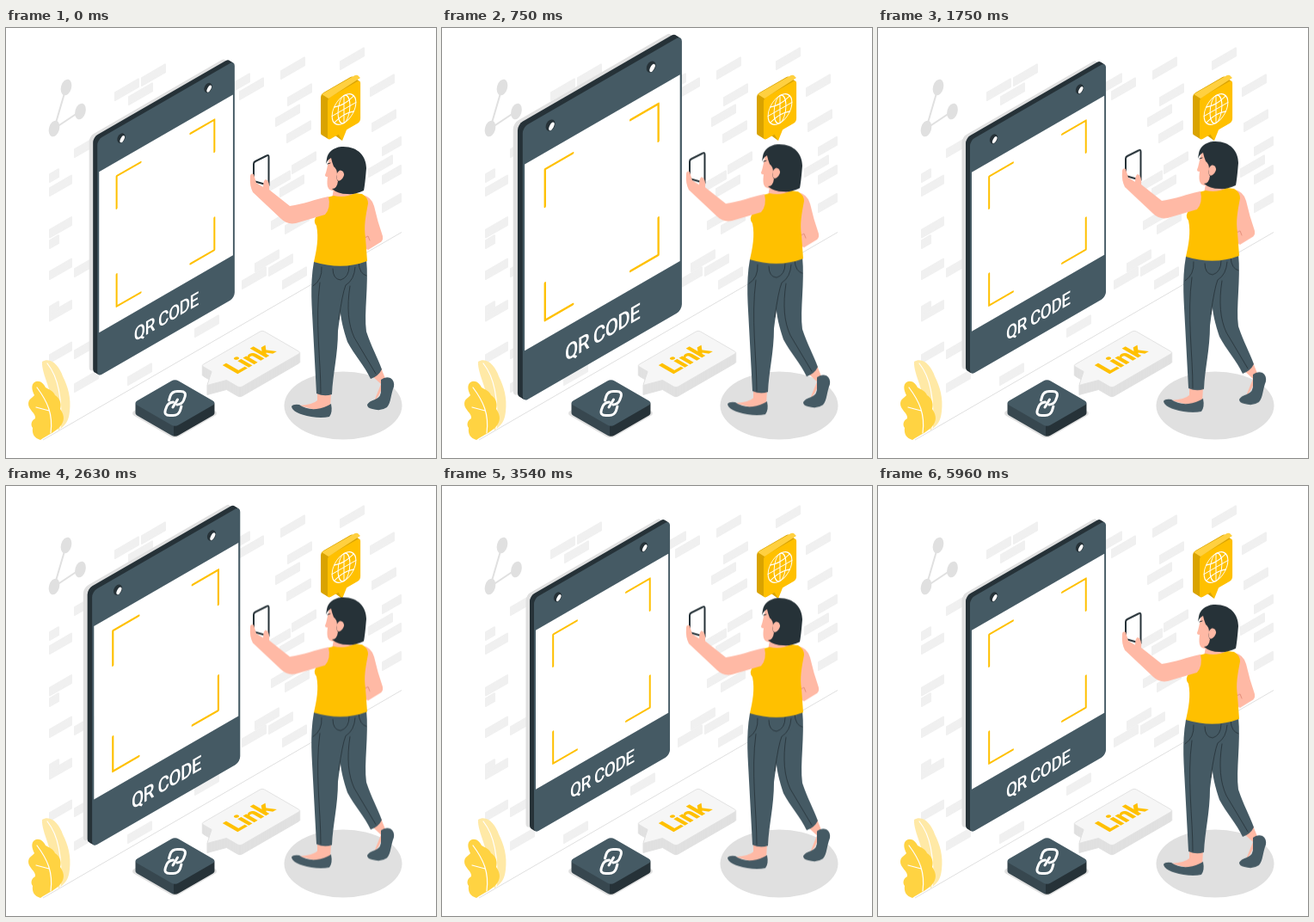
An HTML page for the animation above (6 s loop, 500 px wide and 500 px high).

```html
<!DOCTYPE html>
<html lang="en">
<head>
<meta charset="utf-8">
<title>Scan the code</title>
<style>
  html, body { margin: 0; width: 100%; height: 100%; overflow: hidden; background: #fff; }
  svg { display: block; width: 100%; height: 100%; }
  text { font-family: Roboto, "Liberation Sans", sans-serif; }
  .navy { fill: #455a64; }
  .ink { fill: #263238; }
  .gold { fill: #ffc000; }
  .skin { fill: #ffb9a5; }
  .grey { fill: #e0e0e0; }
  .line { fill: none; stroke-linecap: round; stroke-linejoin: round; }
  #panel { transform-origin: 184px 222px; animation: pulse 6s ease-in-out infinite; }
  #woman { animation: bob 6s infinite; }
  @keyframes pulse {
    0% { transform: scale(1.01); }
    9.7% { transform: scale(1.2); }
    20.4%, 39.3% { transform: scale(1); }
    49% { transform: scale(1.2); }
    59%, 100% { transform: scale(1); }
  }
  @keyframes bob {
    0%, 100% { transform: none; animation-timing-function: cubic-bezier(.3, .35, .7, .85); }
    48% { transform: translateY(-9px); animation-timing-function: cubic-bezier(.3, .15, .7, .65); }
  }
</style>
</head>
<body>
<svg viewBox="0 0 500 500">
  <defs>
    <linearGradient id="faces" x2="1" y2="1">
      <stop offset=".48" stop-color="#37474f"/>
      <stop offset=".48" stop-color="#263238"/>
    </linearGradient>
  </defs>

  <path id="bricks" fill="#f0f0f0" stroke="#f0f0f0" stroke-width="2" stroke-linejoin="round"/>
  <path d="M43 479L460 237.500" stroke="#e0e0e0" fill="none"/>

  <g id="share" class="grey">
    <path class="line" style="fill:none" d="M70 69L56 117L86 97" stroke="#e0e0e0" stroke-width="2"/>
    <ellipse id="node" rx="6" ry="9.500" transform="translate(70 69) rotate(16)"/>
    <use href="#node" x="16.500" y="28"/>
    <use href="#node" x="-14" y="48"/>
  </g>

  <g id="plant">
    <path fill="#ffe9a6" d="M42 388C52 382 62 393 66 405C72 417 76 430 74 446C73 457 69 462 61 468L52 440C56 425 41 403 42 388Z"/>
    <path class="line" stroke="#fff" stroke-width="1.200" d="M48 390C60 405 66 430 63 466"/>
    <path fill="#ffd342" d="M33 412C38 409 43 412 46 418C51 421 55 422 57 427C62 430 65 436 63 443C67 449 69 455 64 462C59 469 49 473 40 479C33 477 30 472 31 465C28 461 30 456 34 454C35 448 26 444 26 437C26 431 31 430 33 427C30 421 29 415 33 412Z"/>
    <path class="line" stroke="#fff" stroke-width="1.200" d="M36 418C48 434 55 449 52 471M50 445L35 441"/>
  </g>

  <g id="panel">
    <rect class="grey" transform="matrix(.866 -.5 0 1 97.500 127)" width="182" height="272" rx="6"/>
    <rect id="board" class="navy" transform="matrix(.866 -.5 0 1 107 131)" width="182.500" height="273" rx="6"/>
    <g id="hole" transform="translate(134.500 129) rotate(28)">
      <ellipse class="ink" rx="4.200" ry="6"/>
      <ellipse cx="1.600" cy=".4" rx="2" ry="4.400" fill="#fff"/>
    </g>
    <use href="#hole" x="100" y="-58"/>
    <g transform="matrix(.866 -.5 0 1 107 131)">
      <rect x="2.300" y="38" width="178" height="185" fill="#fff"/>
      <g class="line" transform="translate(90.600 129.500)" stroke="#ffc000" stroke-width="2.300">
        <path id="corner" d="M-33 -75H-65V-38"/>
        <use href="#corner" transform="scale(-1 1)"/>
        <use href="#corner" transform="scale(1 -1)"/>
        <use href="#corner" transform="scale(-1)"/>
      </g>
      <text x="91.500" y="257" font-size="22" font-weight="500" letter-spacing="-.7" text-anchor="middle" fill="#fff">QR CODE</text>
    </g>
  </g>

  <g id="tile">
    <rect class="grey" transform="matrix(.866 -.5 .866 .5 196 448)" x="-30" y="-30" width="60" height="60" rx="6"/>
    <rect id="key" class="navy" transform="matrix(.866 -.5 .866 .5 196.500 436)" x="-28" y="-28" width="56" height="56" rx="5"/>
    <g class="line" stroke="#fff" stroke-width="3">
      <path id="chain" d="M189.500 433L191 428Q193 422.500 199 422.500H203Q210 422.500 208 429L206.500 433Q204.500 437.500 199 438"/>
      <use href="#chain" transform="rotate(180 196.700 436.500)"/>
      <path d="M194 441L199.500 432"/>
    </g>
  </g>

  <g id="link">
    <path id="label" fill="#f6f6f6" transform="matrix(.866 -.5 .866 .5 285 385)" stroke="#e0e0e0" stroke-width=".8" stroke-linejoin="round"
      d="M-38 -26H38Q41 -26 41 -23V23Q41 26 38 26H-38Q-41 26 -41 23V8L-60 1L-41 -12V-23Q-41 -26 -38 -26Z"/>
    <text class="gold" transform="matrix(.866 -.5 .866 .5 268 403)" font-size="28.500" font-weight="900" letter-spacing="-.4">Link</text>
  </g>

  <g id="globe">
    <path class="gold" d="M383 124L391 131L397 116Z"/>
    <path fill="#d9a300" d="M380 123L391 131L386 123Z"/>
    <rect id="bubble" class="gold" transform="matrix(.866 -.5 0 1 374 82)" width="44" height="49" rx="4"/>
    <path fill="#ffd040" d="M367 77L404 56Q407 54 409 55L412 58L375 82Z"/>
    <g class="line" transform="matrix(.866 -.5 0 1 393 94.500)" stroke="#fff" stroke-width="1.200">
      <circle r="16"/>
      <ellipse rx="8" ry="16"/>
      <path d="M0 -16V16M-16 0H16M-13 -9Q0 -4 13 -9M-13 9Q0 4 13 9"/>
    </g>
  </g>

  <ellipse class="grey" cx="392" cy="439" rx="68.500" ry="39.500"/>

  <g id="woman">
    <g id="feet">
      <path class="skin" d="M362 424H378L377 441L360 444L341 439Q357 438 362 433Z"/>
      <path class="navy" d="M332 440Q334 437 341 438Q349 444 361 443Q370 442 378 437Q380 447 376 452Q367 454 355 452Q333 448 332 440Z"/>
      <path class="skin" d="M423 402L436 395L442 410L433 428L428 434L436 414Z"/>
      <path class="navy" d="M436 409Q441 405 447 407Q452 410 451 417C447 427 448 435 443 441Q436 446 426 443Q420 442 420 438Q422 434 429 432Q437 429 436 420Z"/>
    </g>
    <g id="jeans">
      <path class="navy" d="M386 280L419 268C422 300 416 330 419 353C425 371 432 383 437 397Q433 405 424 408C417 393 405 380 397 365C392 350 389 338 388 322Z"/>
      <path class="navy" d="M358 272C353 300 356 325 357 350L361 425Q370 429 379 426C380 402 386 380 386 352L390 322L402 297L418 271Z"/>
      <path class="line" stroke="#263238" stroke-width=".8" d="M367 278Q368 293 357 300M380 280Q380 292 389 293Q399 290 399 277M410 273Q411 286 419 288M406 278Q405 293 395 299Q391 309 387 339M365 296C359 340 366 385 366 425M400 300C396 325 398 345 405 360L430 402"/>
    </g>
    <path class="skin" d="M414 194Q425 196 428 207Q432 225 438 242Q439 248 434 250L421 258Q416 257 415 247Z"/>
    <path class="line" stroke="#e58f7b" stroke-width="1" d="M417 244L421 242L423 247"/>
    <path class="skin" d="M382 183L404 187V197Q394 205 379 198Z"/>
    <path class="gold" d="M373 197L381 195Q394 198 406 192L414 193Q421 197 421 204C418 220 416 230 418 244L420 271Q391 282 358 272C361 259 364 244 361 230Q356 224 362 218Z"/>
    <path fill="#fff" stroke="#263238" stroke-width="2" stroke-linejoin="round" d="M288 158Q288 156 290 155L303 148.500Q305.500 147 305.500 150V183L288 178Z"/>
    <path class="skin" d="M375 196C359 199 346 205 330 207L306 188Q307 178 302 176Q299 177 299 185L291 180L288 170Q284 168 284 173Q283 183 287 191L320 222Q327 229 337 227L371 217Q378 209 375 196Z"/>
    <g id="head">
      <path class="skin" d="M376 150C374 159 373 166 371 171Q371 173 374 173C373 181 373 188 379 189Q388 191 396 186L399 158L385 146Z"/>
      <path class="ink" d="M373 152C374 145 380 139 390 138C409 137 419 149 419 163C418 175 417 184 416 189Q406 194 397 193Q386 193 379 187Q385 187 386 178Q384 177 385 170Q385 164 381 161Q379 156 378 151Q374 153 372 158Z"/>
      <path class="skin" d="M385 169Q388 163 392 167Q395 172 389 177Q386 179 385 176Z"/>
      <path class="line" stroke="#263238" stroke-width="1" d="M374 158L377 157"/>
    </g>
  </g>
</svg>
<script>
  const SLOPE = .577;
  const $ = id => document.getElementById(id);

  // Gives a flat shape depth: copies of it, one pixel apart, behind it.
  function extrude(id, dx, dy, fill) {
    const face = $(id), steps = Math.max(Math.abs(dx), Math.abs(dy));
    for (let i = steps; i > 0; i--) {
      const copy = face.cloneNode();
      copy.removeAttribute("id");
      copy.style.fill = fill;
      const shift = `translate(${dx * i / steps} ${dy * i / steps}) `;
      copy.setAttribute("transform", shift + face.getAttribute("transform"));
      face.before(copy);
    }
  }
  extrude("board", -5, -3, "#263238");
  extrude("key", 0, 12, "url(#faces)");
  extrude("label", 0, 11, "#e4e4e4");
  extrude("bubble", -8, -5, "#d9a300");

  // Wall: lone bricks, stepped pairs and an even column on the left.
  const brick = (x, y, w = 29) =>
    `M${x + 1} ${y + 1}l${w - 2} ${(2 - w) * SLOPE}v9l${2 - w} ${(w - 2) * SLOPE}z`;
  const pair = (x, y) => brick(x, y) + brick(x + 16, y + 5);
  const lone = [[388, 38], [319, 49], [423, 69], [327, 80], [425, 110], [313, 104], [326, 123],
    [421, 163], [332, 159], [79, 140], [79, 279], [157, 57], [141, 405], [219, 349]];
  const pairs = [[126, 74], [255, 68], [302, 181], [289, 273], [308, 224]];

  let wall = lone.map(p => brick(...p)).join("") + pairs.map(p => pair(...p)).join("");
  for (let i = 0; i < 5; i++) {
    wall += brick(50, 185 + 48.5 * i, 27);
    if (i % 2 == 0) wall += brick(50, 169 + 77 * i / 2, 12);
  }
  for (let i = 0; i < 3; i++) wall += brick(437, 138 + 33 * i, 23);
  for (const x of [274, 321]) wall += brick(x, 293);
  for (const y of [374, 413]) wall += brick(79, y);
  $("bricks").setAttribute("d", wall);
</script>
</body>
</html>
```
